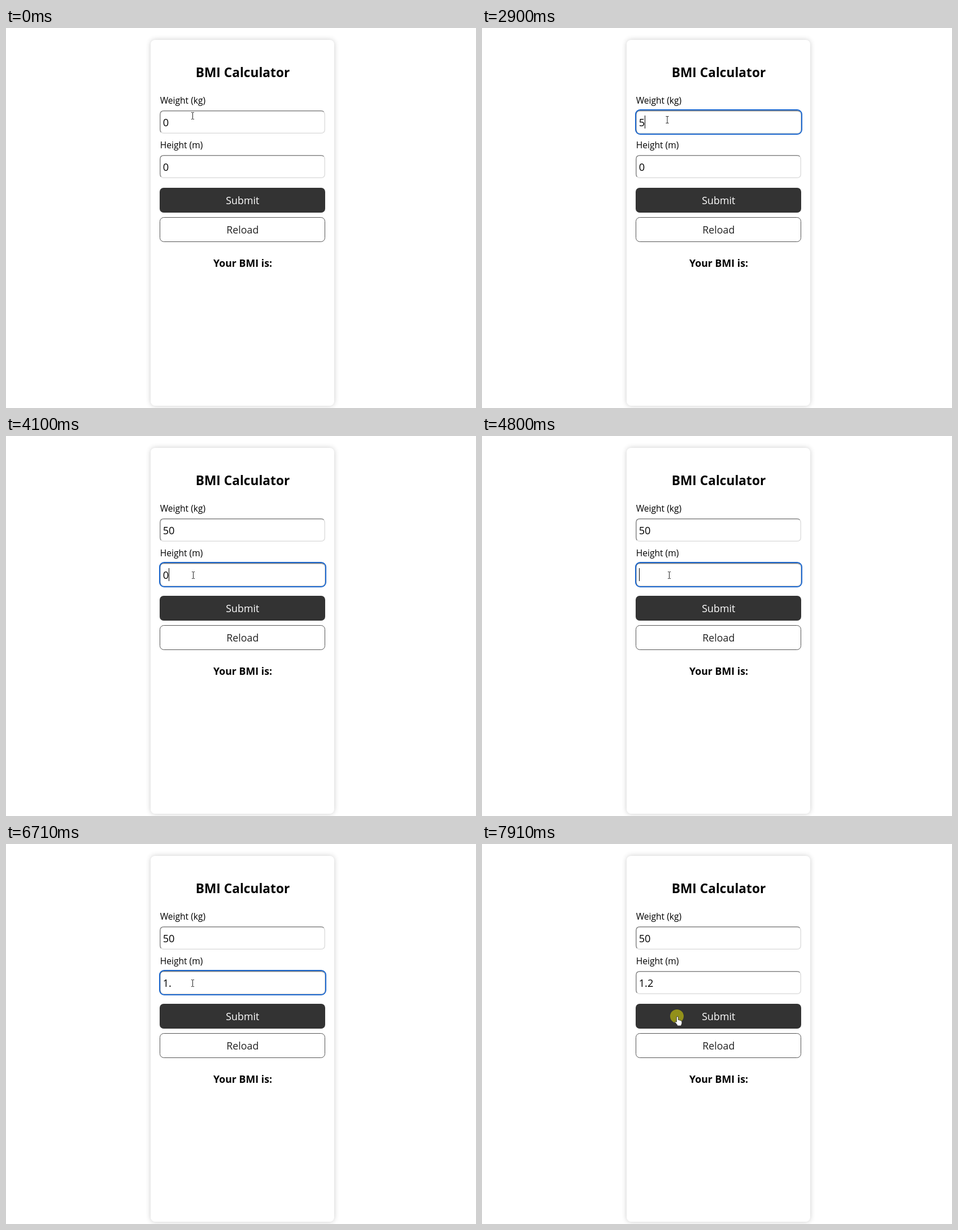
An HTML page for the animation above (8 s loop, 832 by 673 pixels).

```html
<!DOCTYPE html>
<html lang="en">
<head>
<meta charset="utf-8">
<title>BMI Calculator</title>
<style>
  html, body { margin: 0; width: 100%; height: 100%; overflow: hidden; background: #fff; }
  .card {
    position: absolute; left: 256px; top: 21px; width: 325px; height: 648px;
    border-radius: 8px; background: #fff; box-shadow: 0 0 10px rgba(0, 0, 0, .2);
  }
  svg { position: absolute; left: 0; top: 0; }
  text { font-family: "Open Sans", "Noto Sans", sans-serif; fill: #000; white-space: pre; }
  .heading { font-weight: 700; text-anchor: middle; }
  .label { font-size: 15.6px; }
  .value { font-size: 18.2px; }
  .button { font-size: 17.8px; text-anchor: middle; }
  .line { fill: none; stroke-width: 1.5; }
  .ring { fill: none; stroke: #1a66cc; stroke-width: 2; }
</style>
</head>
<body>
<div class="card"></div>
<svg width="832" height="673" viewBox="0 0 832 673">
  <defs>
    <g id="frame">
      <path class="line" stroke="#dedede" d="M562.5 2.5Q564.3 4.5 564.3 8V33.5Q564.3 40.3 557.5 40.3H279.5Q276 40.3 274.5 38.5"/>
      <path class="line" stroke="#858585" d="M274.5 38.5Q272.8 36.5 272.8 33.5V7.5Q272.8 .8 279.5 .8H557.5Q561 .8 562.5 2.5"/>
    </g>
  </defs>

  <text class="heading" x="419" y="86.5" font-size="22.7">BMI Calculator</text>
  <text class="label" x="272.7" y="134">Weight (kg)</text>
  <text class="label" x="272.7" y="213">Height (m)</text>

  <use href="#frame" y="146"/>
  <use href="#frame" y="225"/>
  <rect class="ring" id="ring" x="272" y="145" width="294" height="43" rx="8"/>
  <text class="value" id="weight" x="277.7" y="174"></text>
  <text class="value" id="height" x="277.7" y="253"></text>
  <rect id="caret" width="1" height="23"/>

  <rect x="272" y="283" width="293" height="44" rx="7" fill="#333"/>
  <text class="button" x="418.8" y="312" style="fill:#fff">Submit</text>
  <rect x="272.5" y="335.5" width="292" height="43" rx="7" fill="#fff" stroke="#555"/>
  <text class="button" x="418.8" y="364" style="fill:#222">Reload</text>
  <text class="heading" x="419" y="423" font-size="17.8">Your BMI is:</text>

  <circle id="press" cx="345" cy="305" r="12" fill="#92901a"/>
  <g id="pointer">
    <path id="beam" fill="none" stroke="#222" d="M-2.5-6H-1L0-5.5 1-6H2.5M0-5.5V5.5M-2.5 6H-1L0 5.5 1 6H2.5"/>
    <path id="arrow" fill="#fff" stroke="#000" stroke-width=".9" d="M0 0V15.5L3.6 12.2 6 17.3 8.2 16.3 5.9 11.4H10.8Z"/>
    <path id="hand" fill="#fff" stroke="#222" stroke-width=".8"
      d="M-1.6 2Q-1.6 .4-.2 .4T1.3 2V6.6Q3.2 5.9 3.8 7.2 5.3 6.7 5.9 8 7.9 7.7 7.9 9.8V12.3Q7.9 14.2 6.7 15.4V17H-.4V15.4L-4.2 10.8Q-4.5 9.1-3 9.2L-1.6 10.4Z"/>
  </g>
</svg>
<script>
  const LOOP = 8000;
  const $ = id => document.getElementById(id);
  const show = (id, on) => $(id).setAttribute("visibility", on ? "visible" : "hidden");
  const move = (id, x, y) => $(id).setAttribute("transform", `translate(${x} ${y})`);
  const at = (x, y, shape = "beam") => ({ pointer: { x, y, shape } });

  // Each cue changes only the listed parts of the state; caret is an x position or 0.
  const cues = [
    [0, { weight: "0", height: "0", focus: "", caret: 0, press: false, ...at(330.5, 155.5) }],
    [590, at(328, 159.5)],
    [890, at(328, 162.5)],
    [1090, { focus: "weight", caret: 288 }],
    [1600, { caret: 0 }],
    [1900, { weight: "", caret: 278 }],
    [2100, { caret: 0 }],
    [2600, { caret: 278 }],
    [2900, { weight: "5", caret: 288 }],
    [3200, { caret: 0 }],
    [3300, { weight: "50", caret: 298 }],
    [3500, at(328.5, 169)],
    [3600, { caret: 0, ...at(329.5, 191, "arrow") }],
    [3700, at(330, 220, "arrow")],
    [3800, at(331, 240)],
    [3900, at(331.5, 246.5)],
    [4100, { focus: "height", caret: 288 }],
    [4600, { caret: 0 }],
    [4800, { height: "", caret: 278 }],
    [5090, { caret: 0 }],
    [5200, at(330.5, 246.5)],
    [5600, { height: "1", caret: 288 }],
    [5700, { caret: 0 }],
    [6200, { caret: 288 }],
    [6600, { height: "1.", caret: 294 }],
    [6710, { caret: 0 }],
    [7210, { caret: 294 }],
    [7310, { height: "1.2", caret: 304 }],
    [7410, at(331, 250)],
    [7510, at(334, 260)],
    [7610, at(339, 273, "arrow")],
    [7710, { caret: 0, ...at(343, 295, "hand") }],
    [7810, at(346, 305, "hand")],
    [7910, { focus: "", press: true }]
  ];

  function draw(time) {
    const state = {};
    for (const [start, change] of cues) if (start <= time) Object.assign(state, change);
    const { weight, height, focus, caret, press, pointer } = state;
    const offset = focus === "height" ? 79 : 0;

    $("weight").textContent = weight;
    $("height").textContent = height;
    show("ring", focus);
    move("ring", 0, offset);
    show("caret", caret);
    move("caret", caret, 155 + offset);
    show("press", press);
    move("pointer", pointer.x, pointer.y);
    for (const shape of ["beam", "arrow", "hand"]) show(shape, shape === pointer.shape);
  }

  const begin = performance.now();
  function tick() {
    draw((performance.now() - begin) % LOOP);
    requestAnimationFrame(tick);
  }
  tick();
</script>
</body>
</html>
```
